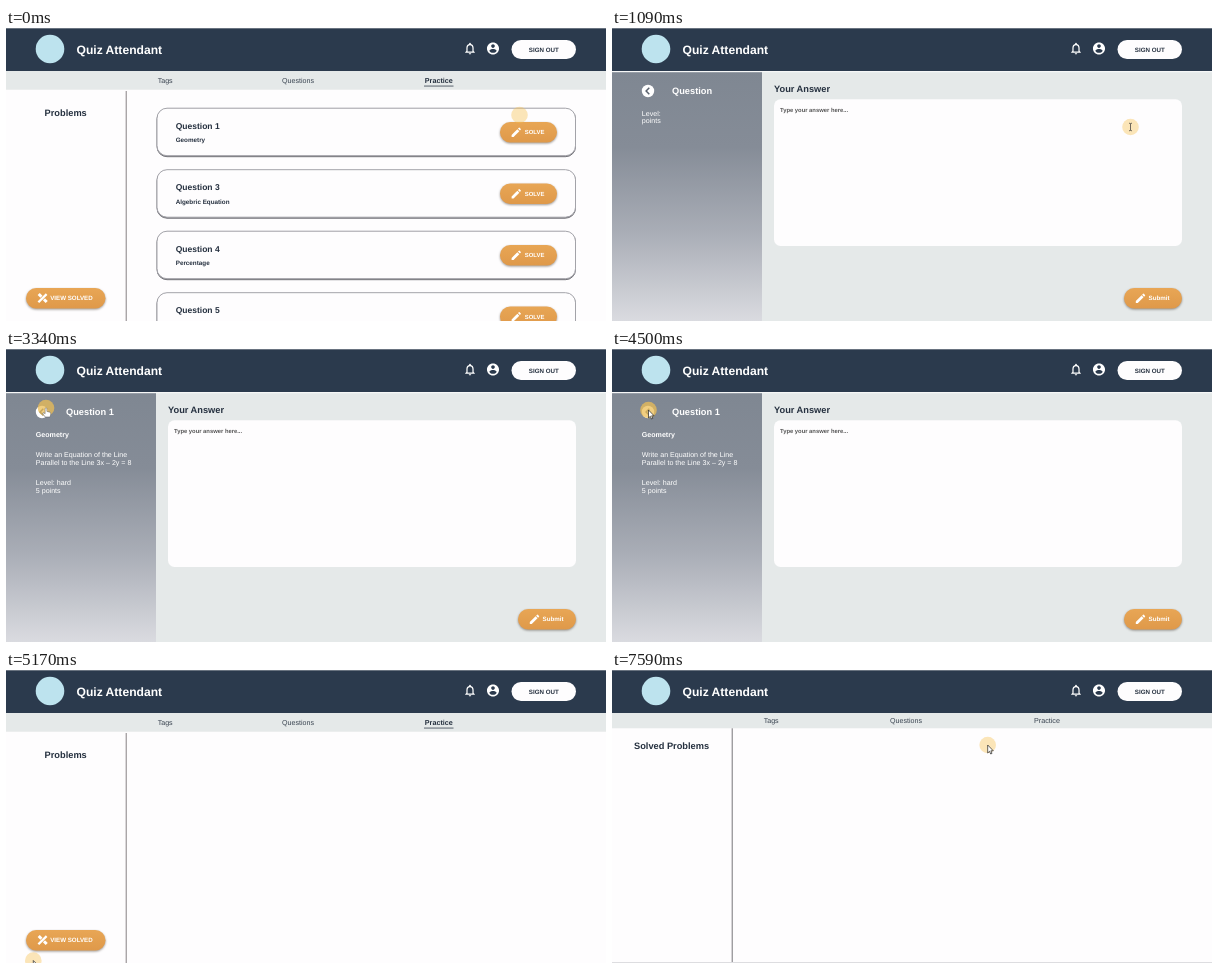
These frames come from a looping animation (600x293 px, 8000 ms). An HTML page:

```html
<!DOCTYPE html>
<html lang="en">
<head>
<meta charset="utf-8">
<title>Quiz Attendant</title>
<style>
html, body { margin: 0; width: 100%; height: 100%; overflow: hidden; background: #fefdfe; }
svg { display: block; width: 600px; height: 293px; font-family: "Liberation Sans", Arial, sans-serif; text-rendering: geometricPrecision; }
.btn { filter: drop-shadow(0 1.3px 1px rgba(60, 50, 40, .5)); }
.card { fill: #fefdfe; stroke: #a3a3a9; stroke-width: 1; filter: drop-shadow(0 1.3px .5px rgba(70, 70, 78, .75)); }
</style>
</head>
<body>
<svg id="stage" viewBox="0 0 600 293">
  <defs>
    <linearGradient id="side" x1="0" y1="0" x2="0" y2="1">
      <stop offset="0" stop-color="#7f8792"/>
      <stop offset=".3" stop-color="#858c97"/>
      <stop offset=".65" stop-color="#aaaeb7"/>
      <stop offset="1" stop-color="#dadbe0"/>
    </linearGradient>
    <linearGradient id="amber" x1="0" y1="0" x2="0" y2="1">
      <stop offset="0" stop-color="#e8a655"/>
      <stop offset="1" stop-color="#df994a"/>
    </linearGradient>
  </defs>
  <g id="list"></g>
  <g id="ask"></g>
  <g id="solved"></g>
  <g id="head"></g>
  <g id="pointer">
    <circle id="halo" r="8.3"/>
    <path id="arrow" d="M0 0V8L1.8 6.3 3 9 4.3 8.4 3.2 5.8H5.6Z" fill="#fff" stroke="#222" stroke-width=".7"/>
    <path id="beam" d="M-1.4-3.8Q0-3.8 0-3V3Q0 3.8-1.4 3.8M1.4-3.8Q0-3.8 0-3M0 3Q0 3.8 1.4 3.8" fill="none" stroke="#333" stroke-width=".7"/>
    <path id="hand" d="M-.9.3Q0-.7.9.3V3.4L3.9 4.2Q5 4.6 4.8 5.9L4.1 9H-.8L-3.2 5.7Q-3.3 4.4-2 4.8L-.9 5.8Z" fill="#fff" stroke="#555" stroke-width=".5"/>
  </g>
</svg>
<script>
const $ = id => document.getElementById(id);
const LOOP = 8000, DARK = "#25303f", NAVY = "#2b3a4d";

const ICON = {
  pencil: "M3 17.25V21h3.75L17.81 9.94l-3.75-3.75L3 17.25zM20.71 7.04c.39-.39.39-1.02 0-1.41l-2.34-2.34a1 1 0 0 0-1.41 0l-1.83 1.83 3.75 3.75 1.83-1.83z",
  bell: "M12 22c1.1 0 2-.9 2-2h-4c0 1.1.9 2 2 2zm6-6v-5c0-3.07-1.63-5.64-4.5-6.32V4c0-.83-.67-1.5-1.5-1.5s-1.5.67-1.5 1.5v.68C7.64 5.36 6 7.92 6 11v5l-2 2v1h16v-1l-2-2zm-2 1H8v-6c0-2.48 1.51-4.5 4-4.5s4 2.02 4 4.5v6z",
  user: "M12 2C6.48 2 2 6.48 2 12s4.48 10 10 10 10-4.48 10-10S17.52 2 12 2zm0 3c1.66 0 3 1.34 3 3s-1.34 3-3 3-3-1.34-3-3 1.34-3 3-3zm0 14.2c-2.5 0-4.71-1.28-6-3.22.03-1.99 4-3.08 6-3.08 1.99 0 5.97 1.09 6 3.08-1.29 1.94-3.5 3.22-6 3.22z"
};

const rect = (x, y, w, h, fill, r = 0) =>
  `<rect x="${x}" y="${y}" width="${w}" height="${h}" rx="${r}" fill="${fill}"/>`;
const text = (x, y, size, str, fill = DARK, bold = true) =>
  `<text x="${x}" y="${y}" font-size="${size}" fill="${fill}" font-weight="${bold ? 700 : 400}">${str}</text>`;
// Icons are drawn on a 24-unit grid centred on x, y.
const icon = (name, x, y, size) =>
  `<path fill="#fff" transform="translate(${x - size / 2} ${y - size / 2}) scale(${size / 24})" d="${ICON[name]}"/>`;
const button = (x, y, w, body) =>
  `<g class="btn">${rect(x, y, w, 20.5, "url(#amber)", 10.2)}</g>${body}`;

function card(y, title, tag) {
  return `<rect class="card" x="151" y="${y}" width="418.5" height="47.5" rx="10"/>` +
    text(169.7, y + 20.3, 8.5, title) + text(169.7, y + 34, 6.3, tag) +
    button(494, y + 13.7, 57, icon("pencil", 510.3, y + 24, 12.5) + text(518.7, y + 26.2, 5.95, "SOLVE", "#fff"));
}

const divider = (y, color) => rect(119.7, y, 1, 293 - y, color);

function drawHead() {
  return rect(0, 0, 600, 43, NAVY) + rect(0, 0, 600, 1, "#697380") +
    `<circle cx="44" cy="21" r="14.3" fill="#bde3ee"/>` +
    text(70.5, 25.6, 12.1, "Quiz Attendant", "#fff") +
    icon("bell", 464, 20.5, 14.5) + icon("user", 487, 20.5, 14.5) +
    rect(505.5, 12, 64.5, 19, "#fefdfe", 9.5) + text(522.8, 23.7, 6.2, "SIGN OUT");
}

function drawList() {
  const tags = ["Geometry", "Algebric Equation", "Percentage", ""];
  const nums = [1, 3, 4, 5];
  const cards = nums.map((n, i) => card(80.2 + 61.5 * i, "Question " + n, tags[i])).join("");
  const tool = `<g transform="translate(36.7 270)" stroke="#fff" stroke-linecap="butt">
    <path d="M-4-4L4 4" stroke-width="3"/><path d="M-4 4L4-4" stroke="#e3a04f" stroke-width="3.6"/>
    <path d="M-4.3 4.3L3.9-3.9" stroke-width="2.3"/></g>`;
  return rect(0, 43, 600, 250, "#fefdfe") + rect(0, 43, 600, 18.7, "#e5e9e9") +
    text(151.7, 54.8, 7.1, "Tags", "#394350", false) +
    text(276, 54.8, 7.1, "Questions", "#394350", false) +
    text(418.8, 54.6, 7.2, "Practice") + rect(418, 57.6, 29.5, .9, "#4a5460") +
    divider(63, "#878084") + text(38.6, 88.2, 9.25, "Problems") +
    `<g id="cards">${cards}</g>` +
    button(20, 260, 79.5, tool + text(44.2, 272.2, 6.2, "VIEW SOLVED", "#fff"));
}

function drawAsk() {
  const side = (y, str, bold = false) => text(29.8, y, 7.1, str, "#fff", bold);
  return rect(0, 43, 600, 250, "#e5e9e9") + rect(0, 44, 150, 249, "url(#side)") +
    rect(0, 43, 600, 1.2, "#f6f7f7") +
    `<circle cx="36" cy="63" r="6.2" fill="#fff"/>
     <path d="M37.3 59.8L34.1 63 37.3 66.2" fill="none" stroke="#59616d" stroke-width="1.5"/>` +
    `<g id="blank">${text(60, 66.2, 9.25, "Question", "#fff") + side(87.5, "Level:") + side(95.4, "points")}</g>` +
    `<g id="full">${text(60, 66.2, 9.25, "Question 1", "#fff") + side(87.5, "Geometry", true) +
      side(107.8, "Write an Equation of the Line") + side(115.8, "Parallel to the Line 3x – 2y = 8") +
      side(136, "Level: hard") + side(144, "5 points")}</g>` +
    text(162, 63.8, 9.25, "Your Answer") + rect(162, 71.3, 408, 146.7, "#fefdfe", 6.5) +
    text(168, 83.5, 5.85, "Type your answer here...", "#555") +
    button(512, 260, 58, icon("pencil", 528.5, 270.3, 12.5) + text(536.6, 272.4, 6.2, "Submit", "#fff"));
}

function drawSolved() {
  return rect(0, 43, 600, 250, "#fefdfe") + rect(0, 43, 600, 15.3, "#e5e9e9") +
    text(151.7, 53.4, 7.1, "Tags", "#394350", false) +
    text(278, 53.4, 7.1, "Questions", "#394350", false) +
    text(422, 53.4, 7.2, "Practice", "#394350", false) +
    divider(58.3, "#77757a") + text(22, 79, 9.25, "Solved Problems") +
    rect(0, 292, 600, 1, "#dddde0");
}

$("head").innerHTML = drawHead();
$("list").innerHTML = drawList();
$("ask").innerHTML = drawAsk();
$("solved").innerHTML = drawSolved();

// Pointer path: time, x, y, shape from then on.
const path = [
  [0, 513.5, 87, ""], [90, 513.5, 87, "arrow"], [250, 514, 100, "hand"], [420, 514, 100, "hand"],
  [500, 517, 103, "hand"], [670, 517, 103, "arrow"], [840, 518, 100, "beam"], [1090, 518.5, 99, "beam"],
  [1250, 518.5, 99, "beam"], [1500, 460, 92, "beam"], [1670, 440, 88, "beam"], [1920, 140, 44, "arrow"],
  [2060, 58, 31, "hand"], [2170, 58, 31, "hand"], [2420, 46, 50, "arrow"], [2500, 44, 54, "arrow"],
  [2750, 41, 59, "hand"], [3340, 40, 59, "hand"], [3750, 36.5, 61, "hand"], [4000, 36.5, 61, "arrow"],
  [4590, 36.5, 61, "arrow"], [4920, 13, 180, "arrow"], [5170, 27.3, 290.5, "arrow"],
  [5590, 46, 276, "hand"], [5840, 50, 273.5, "hand"], [6420, 50, 273.5, "arrow"],
  [7000, 377, 76, "arrow"], [7580, 377, 76, "arrow"], [7590, 375.7, 75, "arrow"], [LOOP, 375.7, 75, "arrow"]
];
const show = (id, on) => { $(id).style.display = on ? "" : "none"; };

function pointerAt(t) {
  let i = 0;
  while (i < path.length - 2 && t >= path[i + 1][0]) i++;
  const [t0, x0, y0, shape] = path[i], [t1, x1, y1] = path[i + 1];
  const p = (t - t0) / (t1 - t0), e = p * p * (3 - 2 * p);
  return { x: x0 + (x1 - x0) * e, y: y0 + (y1 - y0) * e, shape };
}

function render(t) {
  const ask = t >= 670 && t < 4590, solved = t >= 6420;
  show("list", !ask && !solved);
  show("ask", ask);
  show("solved", solved);
  show("cards", t < 670);
  show("blank", t < 3340);
  show("full", t >= 3340);

  const { x, y, shape } = pointerAt(t);
  const onDark = ask && x < 150;
  $("pointer").setAttribute("transform", `translate(${x.toFixed(2)} ${y.toFixed(2)})`);
  $("halo").setAttribute("fill", onDark ? "#ecbd55" : "#f7c04f");
  $("halo").setAttribute("fill-opacity", onDark ? .75 : .4);
  for (const id of ["arrow", "beam", "hand"]) show(id, id === shape);
}

const start = performance.now();
function tick() {
  render((performance.now() - start) % LOOP);
  requestAnimationFrame(tick);
}
tick();
</script>
</body>
</html>
```
